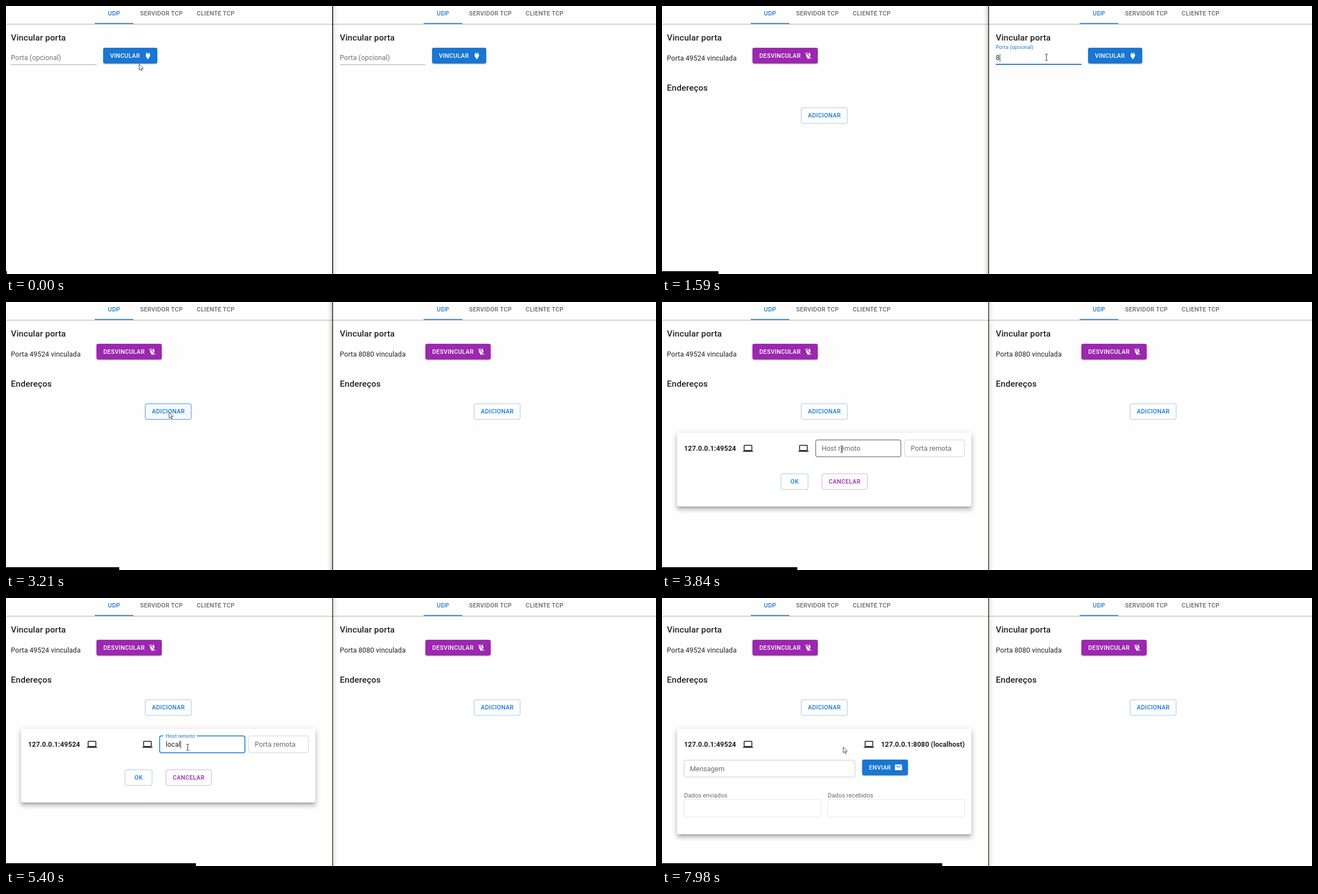
An HTML page that plays this animation: 1164x481 px, repeating every 8000 ms.

```html
<!DOCTYPE html>
<html lang="pt">
<head>
<meta charset="utf-8">
<title>UDP</title>
<style>
html, body { margin: 0; width: 100%; height: 100%; overflow: hidden; background: #fefefe; }
svg { display: block; width: 1164px; height: 481px; font-family: Roboto, sans-serif; }
text { white-space: pre; }
</style>
</head>
<body>
<svg id="stage" viewBox="0 0 1164 481"></svg>
<script>
const LOOP = 8000, STEP = 30;
const BLUE = '#1976d2', PURPLE = '#9c27b0', INK = 'rgba(0,0,0,.87)', SOFT = 'rgba(0,0,0,.6)';
const BODY = 12.27, HEAD = 15.33, BTN = 10.73;

// Moments of the session, in ms
const BIND_LEFT = 300, FOCUS_RIGHT = 810, BIND_RIGHT = 2460, ADD = 3330;
const FOCUS_HOST = 4040, FOCUS_PORT = 6010, CONFIRM = 7450;
const BIND_KEYS = [1560, 1770, 1980, 2190];
const HOST_KEYS = [4920, 5040, 5160, 5260, 5370, 5580, 5680, 5780, 5880];
const PORT_KEYS = [6660, 6810, 6960, 7110];
const MOUSE = [[0, 238.5, 104.5], [150, 236, 92], [330, 236, 92], [740, 688.5, 92], [2580, 688.5, 92],
  [3200, 292, 198], [3380, 292, 198], [3780, 322, 264], [3900, 322, 264], [4010, 325.5, 268],
  [CONFIRM - 1, 325.5, 268], [CONFIRM, 324.5, 267.5], [LOOP, 324.5, 267.5]];

const ICON = {
  plug: 'M16 7V3h-2v4h-4V3H8v4C7 7 6 8 6 9v5.5L9.5 18v3h5v-3l3.5-3.5V9c0-1-1-2-2-2z',
  unplug: 'M18 14.5V9c0-1-1-2-2-2V3h-2v4h-4V3H8v2.5l9.5 9.5zm-1.8 1.8L4 4 2.7 5.3l3.4 3.3L6 9v5.5L9.5 18v3h5v-3l.5-.5 4.4 4.5 1.3-1.3z',
  laptop: 'M20 18c1.1 0 2-.9 2-2V6c0-1.1-.9-2-2-2H4c-1.1 0-2 .9-2 2v10c0 1.1.9 2 2 2H0v2h24v-2zM4 6h16v10H4z',
  mail: 'M20 4H4c-1.1 0-2 .9-2 2v12c0 1.1.9 2 2 2h16c1.1 0 2-.9 2-2V6c0-1.1-.9-2-2-2zm0 4l-8 5-8-5V6l8 5 8-5z'
};

const clamp = v => Math.max(0, Math.min(1, v));
const mix = (a, b, p) => a + (b - a) * p;
const blend = (a, b, p) => `rgb(${a.map((v, i) => Math.round(mix(v, b[i], p)))})`;
const typed = (word, keys, t) => word.slice(0, keys.filter(k => t >= k).length);

// cubic-bezier(0, 0, .2, 1) over 200 ms
function ease(ms) {
  const x = clamp(ms / 200);
  let lo = 0, hi = 1;
  for (let i = 0; i < 20; i++) {
    const s = (lo + hi) / 2;
    if (.6 * s * s + .4 * s ** 3 < x) lo = s; else hi = s;
  }
  return lo * lo * (3 - 2 * lo);
}

const pen = document.createElement('canvas').getContext('2d');
function width(s) {
  pen.font = `${BODY}px Roboto, sans-serif`;
  return pen.measureText(s).width + s.length * .115;
}

const rect = (x, y, w, h, fill, more = '') =>
  `<rect x="${x}" y="${y}" width="${w}" height="${h}" fill="${fill}" ${more}/>`;
const text = (s, x, y, size = BODY, fill = INK, weight = 400, gap = .0094 * size, more = '') =>
  `<text x="${x}" y="${y}" font-size="${size}" fill="${fill}" font-weight="${weight}" letter-spacing="${gap}" ${more}>${s}</text>`;
const caps = (s, x, y, fill) => text(s, x, y, BTN, fill, 500, .306);
const heading = (s, x, y) => text(s, x, y, HEAD, INK, 500, .115);
const icon = (name, x, y, size, fill) =>
  `<path d="${ICON[name]}" fill="${fill}" transform="translate(${x} ${y}) scale(${size / 24})"/>`;
const frame = (x, y, w, h, stroke, line = .8) =>
  rect(x, y, w, h, 'none', `rx="3" stroke="${stroke}" stroke-width="${line}"`);

// One box shadow: offset, blur, spread, alpha
const shadow = (x, y, w, h, [dy, blur, grow, a]) =>
  rect(x - grow, y + dy - grow, w + 2 * grow, h + 2 * grow, '#000', `rx="3" opacity="${a}" style="filter:blur(${blur / 2}px)"`);
const raised = (x, y, w, h, fill, layers) =>
  layers.map(l => shadow(x, y, w, h, l)).join('') + rect(x, y, w, h, fill, 'rx="3"');

const solid = (s, x, y, w, fill, name) =>
  raised(x, y, w, 28, fill, [[2.3, .8, -1.5, .2], [1.5, 1.5, 0, .14], [.8, 3.8, 0, .12]]) +
  caps(s, x + 12.3, y + 18, '#fff') + icon(name, x + w - 24.6, y + 6.3, 15.33, '#fff');
const outlined = (s, x, y, w, pad, color, hover) =>
  rect(x, y, w, 28, color, `rx="3" fill-opacity="${hover ? .04 : 0}" stroke="${color}" stroke-opacity="${hover ? 1 : .5}" stroke-width=".8"`) +
  caps(s, x + pad, y + 17.7, color);

const caret = (x, y, since, t) => t >= since && (t - since) % 1000 < 500 ? rect(x, y - 11.5, .8, 14.5, INK) : '';

function tabs(x) {
  return caps('UDP', x + 182.6, 17.3, BLUE) + caps('SERVIDOR TCP', x + 240.2, 17.3, SOFT) +
    caps('CLIENTE TCP', x + 341.6, 17.3, SOFT) + rect(x + 159, 30.6, 69, 1.5, BLUE) + heading('Vincular porta', x + 8.8, 62.2);
}

function bound(x, port, since, t, hover) {
  const p = ease((t - since) * .8);
  return text(`Porta ${port} vinculada`, x + 8.8, 98) +
    solid('DESVINCULAR', x + 162, 75, 117, blend([25, 118, 210], [156, 39, 176], p), 'unplug') +
    heading('Endereços', x + 8.8, 151.7) + outlined('ADICIONAR', x + 249.3, 182.7, 82.4, 12, BLUE, hover);
}

function unbound(x, t, focus, hover) {
  const p = ease(t - focus), on = t >= focus, size = mix(BODY, BODY * .75, p);
  const left = x + 8.8, w = 153.4;
  let out = text('Porta (opcional)', left, mix(97.3, 77.4, p), size, blend([112, 112, 112], [25, 118, 210], p));
  out += on || (t > 700 && x) ? rect(left, 103.9, w, 1.5, INK) : rect(left, 104.8, w, .8, 'rgba(0,0,0,.46)');
  if (on) {
    const word = typed('8080', BIND_KEYS, t);
    out += rect(left + w * (1 - p) / 2, 103.9, w * p, 1.5, BLUE) + text(word, left, 97.3);
    out += caret(left + width(word), 97.3, [focus, ...BIND_KEYS].filter(k => t >= k).pop(), t);
  }
  return out + solid('VINCULAR', x + 174, 75, 97, !x && hover ? '#1565c0' : BLUE, 'plug');
}

function field(o, t) {
  const { x, w, label, gap, focus, blur, keys } = o;
  const on = t >= focus && t < blur, p = ease(t - focus), y = 247.6, h = 30.2;
  const word = typed(o.value, keys, t);
  const edge = on ? BLUE : o.hover && t > 3780 ? INK : 'rgba(0,0,0,.23)';
  let out = frame(x, y, w, h, edge, on ? 1.5 : .8);
  if (p > 0) out += rect(x + 6.3, y - 1.2, gap * p, 2.6, '#fff');
  out += text(label, x + 10.7, mix(267.2, 250.6, p), mix(BODY, BODY * .75, p), on ? BLUE : SOFT);
  if (on && !word) out += text(o.hint, x + 10.7, 267.2, BODY, INK, 400, .115, `opacity="${.42 * p}"`);
  out += text(word, x + 10.7, 267.2);
  if (on) out += caret(x + 10.7 + width(word), 267.2, [focus, ...keys].filter(k => t >= k).pop(), t);
  return out;
}

const host = { x: 275.2, w: 152.6, label: 'Host remoto', gap: 60, focus: FOCUS_HOST, blur: FOCUS_PORT,
  keys: HOST_KEYS, value: 'localhost', hint: 'e.g. example.com', hover: true };
const port = { x: 434.7, w: 106.8, label: 'Porta remota', gap: 64, focus: FOCUS_PORT, blur: LOOP,
  keys: PORT_KEYS, value: '8080', hint: 'e.g. 8080' };

function card(t) {
  const done = t >= CONFIRM;
  let out = raised(27, 235, 527, done ? 189 : 132, '#fff', [[3.8, 4.6, -2.3, .2], [6.1, 7.7, .8, .14], [2.3, 10.7, 1.5, .12]]);
  out += text('127.0.0.1:49524', 39.4, 267.2, BODY, INK, 700) + icon('laptop', 144.8, 253.4, 18.4, INK);
  if (!done) return out + icon('laptop', 244.1, 253.4, 18.4, INK) + field(host, t) + field(port, t) +
    outlined('OK', 213.1, 308.3, 48.5, 17, BLUE) + outlined('CANCELAR', 286.6, 308.3, 81.2, 11.9, PURPLE);
  out += icon('laptop', 361.4, 253.4, 18.4, INK) + text('127.0.0.1:8080 (localhost)', 392.2, 267.2, BODY, INK, 700);
  out += frame(39.6, 291.1, 306, 30.2, 'rgba(0,0,0,.26)') + text('Mensagem', 50, 310.8, BODY, SOFT);
  out += solid('ENVIAR', 358.4, 290, 82, BLUE, 'mail');
  [['Dados enviados', 39.5], ['Dados recebidos', 296.8]].forEach(([s, x]) => {
    out += text(s, x, 357.7, BTN, SOFT) + frame(x, 361.8, 244.8, 31, 'rgba(0,0,0,.13)');
  });
  return out;
}

function divider(t) {
  const right = t >= FOCUS_RIGHT && t < ADD;
  const tone = t < FOCUS_RIGHT ? '#303030' : right ? '#4d4a40' : '#50563a';
  let out = '';
  for (let i = 0; i < 10; i++)
    out += rect(right ? 583 - i : 586 + i, 0, 1, 481, '#000', `opacity="${(right ? .16 : .08) * (1 - i / 10) ** 2}"`);
  return out + rect(584, 0, 1.8, 481, tone);
}

function pointer(t) {
  const i = MOUSE.findIndex(m => m[0] > t), [t0, x0, y0] = MOUSE[i - 1], [t1, x1, y1] = MOUSE[i];
  const u = (t - t0) / (t1 - t0), p = u * u * (3 - 2 * u);
  const x = mix(x0, x1, p), y = mix(y0, y1, p);
  const beam = (t > 700 && t < 2610) || (t > 3750 && t < CONFIRM);
  let out = '';
  [BIND_LEFT, FOCUS_RIGHT, ADD, FOCUS_HOST].forEach(c => {
    if (t >= c - 60 && t < c + 120) out += `<circle cx="${x}" cy="${y}" r="9" fill="#f5f03c" opacity=".8"/>`;
  });
  const shape = beam ? 'd="M-2.5-5.5H-.8L0-5 .8-5.5H2.5M0-5V5M-2.5 5.5H-.8L0 5 .8 5.5H2.5" fill="none" stroke="#222" stroke-width=".9"'
    : 'd="M0 0V10.4L2.4 8.2 4 11.8 5.6 11.1 4 7.6H7.3Z" fill="#fff" stroke="#222" stroke-width=".8"';
  return out + `<path transform="translate(${x} ${y})" ${shape}/>`;
}

function scene(t) {
  let out = rect(0, 32, 1164, 1.2, '#bdbdbd') + rect(0, 33.2, 1164, 1, '#ececec') + tabs(0) + tabs(589);
  out += t < BIND_LEFT ? unbound(0, t, LOOP, t >= 60) : bound(0, 49524, BIND_LEFT, t, t > 3150 && t < 3500);
  out += t < BIND_RIGHT ? unbound(589, t, FOCUS_RIGHT) : bound(589, 8080, BIND_RIGHT, t);
  if (t >= ADD) out += card(t);
  return out + divider(t) + rect(0, 476, 1.5 + .0627 * t, 5, '#000') + pointer(t);
}

const stage = document.getElementById('stage');
let last = -1;
function tick() {
  const t = Math.floor(performance.now() % LOOP / STEP) * STEP;
  if (t !== last) stage.innerHTML = scene(last = t);
  requestAnimationFrame(tick);
}
tick();
</script>
</body>
</html>
```
